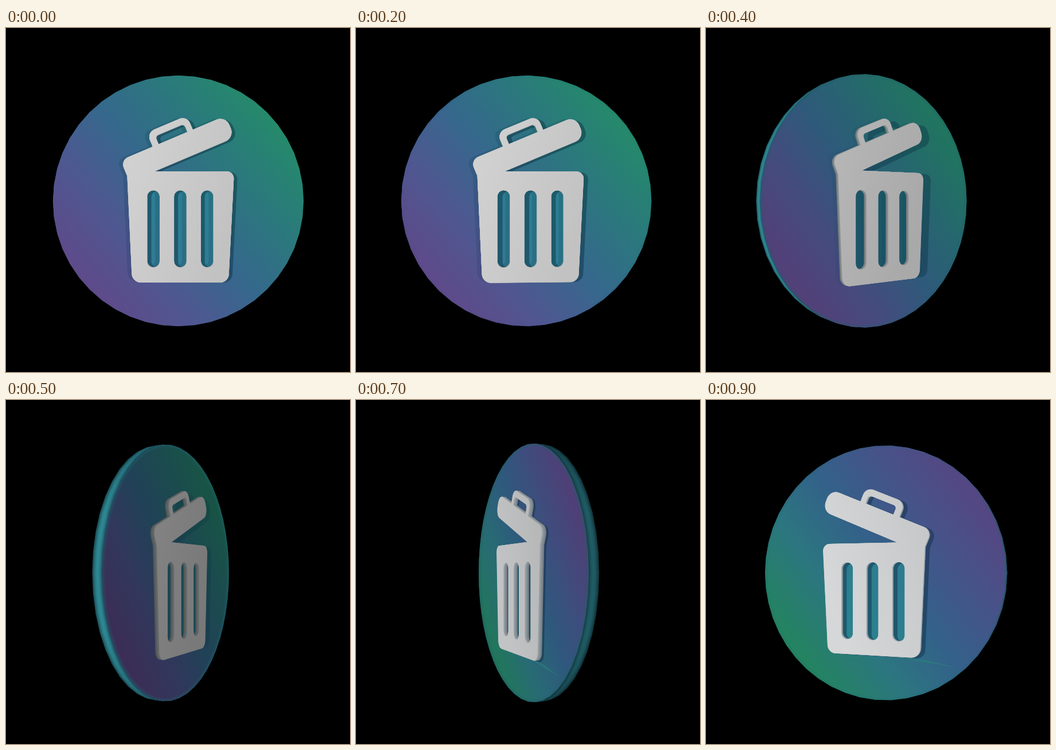
Animation of 600 by 600 pixels, one loop 1 s. Source, as an HTML page with a canvas:

```html
<!DOCTYPE html>
<html lang="en">
<head>
<meta charset="utf-8">
<title>Turning bin badge</title>
<style>
html, body { margin: 0; width: 100%; height: 100%; overflow: hidden; background: #000; }
canvas { display: block; width: 100vmin; height: 100vmin; }
</style>
</head>
<body>
<canvas id="stage" width="600" height="600"></canvas>
<script>
const ctx = document.getElementById('stage').getContext('2d');
const CX = 300.5, CY = 301.5, EYE = 857;
const R = 218, TOP = 2.5, BOTTOM = -14, RISE = 7.5;
const LOOP = 1000, STEP = 100, START = 117, TURN = 980;

const rgb = (c, k = 1, a = 1) => `rgba(${c.map(v => Math.round(Math.min(255, v * k)))},${a})`;
let cos = 1, sin = 0;

// Local point on the badge to stage point
function project(x, y, z) {
  const k = EYE / (EYE + x * sin - z * cos);
  return [CX + (x * cos + z * sin) * k, CY + y * k];
}

// Polygon with circular corners
function rounded(points, radii) {
  const out = [], n = points.length;
  points.forEach((p, i) => {
    const toward = q => {
      const d = Math.hypot(q[0] - p[0], q[1] - p[1]);
      return [p[0] + (q[0] - p[0]) * radii[i] / d, p[1] + (q[1] - p[1]) * radii[i] / d];
    };
    const a = toward(points[(i + n - 1) % n]), b = toward(points[(i + 1) % n]);
    for (let s = 0; s <= 8; s++) {
      const t = s / 8, wa = (1 - t) ** 2, wp = 1.414 * t * (1 - t), wb = t * t, w = wa + wp + wb;
      out.push([0, 1].map(j => (wa * a[j] + wp * p[j] + wb * b[j]) / w));
    }
  });
  return out;
}

const box = (l, t, r, b) => [[l, t], [r, t], [r, b], [l, b]];
const tilt = ([u, n]) => [u * .92 + n * .39, -u * .39 + n * .92];
const place = shape => shape.map(([x, y]) => [(x - CX) / 1.0118, (y - CY) / 1.0118]);

const slots = [246, 293, 340].map(x => place(rounded(box(x, 283, x + 22, 418), [11, 11, 11, 11])));
const icon = [
  place(rounded([[211, 250], [398, 250], [388, 444], [220, 444]], [4, 13, 14, 15])),
  place(rounded(box(94, 290.6, 293, 331.4).map(tilt), [14, 17, 17, 12])),
  place(rounded(box(155, 264, 231, 306).map(tilt), [14, 14, 1, 1])),
  place(rounded(box(166, 275, 221, 302).map(tilt), [6, 6, 1, 1])).reverse(),
  ...slots.map(s => [...s].reverse())
];
const disc = [Array.from({ length: 48 }, (_, i) => {
  const a = i * Math.PI / 24;
  return [R * Math.sin(a), -R * Math.cos(a)];
})];

function trace(shapes, z, dx = 0, dy = 0) {
  ctx.beginPath();
  for (const shape of shapes) {
    shape.forEach(([x, y], i) => {
      const p = project(x + dx, y + dy, z);
      i ? ctx.lineTo(...p) : ctx.moveTo(...p);
    });
    ctx.closePath();
  }
}

function fill(shapes, z, style, dx, dy) {
  trace(shapes, z, dx, dy);
  ctx.fillStyle = style;
  ctx.fill();
}

// Gradient fixed to the badge surface, fitted to its projected width
function fillGradient(shapes, z, from, to, colors, k) {
  const g = ctx.createLinearGradient(...from, ...to);
  colors.forEach((c, i) => g.addColorStop(i / (colors.length - 1), rgb(c, k)));
  trace(shapes, z);
  const a = project(-170, 0, z), b = project(170, 0, z);
  const sx = (b[0] - a[0]) / 340;
  ctx.save();
  ctx.transform(Math.abs(sx) < .005 ? .005 : sx, 0, 0, 1, (a[0] + b[0]) / 2, CY);
  ctx.fillStyle = g;
  ctx.fill();
  ctx.restore();
}

const FRONT = [[94, 74, 138], [78, 88, 145], [53, 104, 140], [43, 120, 125], [37, 137, 107]];
const BACK = [[87, 70, 131], [70, 84, 138], [51, 98, 138], [44, 119, 129], [36, 132, 98]];
const TEAL = [46, 135, 148], MID = [34, 102, 115], DARK = [18, 56, 68];

function drawIcon(front, light) {
  const base = front ? TOP : BOTTOM, dir = front ? 1 : -1;
  const grey = front ? [201, 201, 201] : [207, 208, 209];
  const wall = front ? [158, 165, 167] : [158, 168, 175];
  for (let d = 0; d < RISE; d += .5) {
    fill(icon, base + dir * d, rgb(wall, light * (.8 + .04 * d)));
  }
  const hi = grey.map(v => v + 8), lo = grey.map(v => v - 7);
  fillGradient(icon, base + dir * RISE, [-95, -30], [95, 30], front ? [hi, lo] : [lo, hi], light);
}

function drawFace(front, light) {
  const z = front ? TOP : BOTTOM;
  if (front) fillGradient(disc, z, [-160, 144], [170, -130], FRONT, light);
  else fillGradient(disc, z, [-190, -120], [150, 135], BACK, light);

  ctx.save();
  trace(disc, z);
  ctx.clip();
  ctx.strokeStyle = rgb(DARK.map((v, i) => (v + TEAL[i]) / 2), 1, .22 * Math.abs(sin));
  for (const w of [10, 6, 3]) {
    ctx.lineWidth = w;
    ctx.stroke();
  }
  fill(slots, z, rgb([43, 133, 148], light, .75));
  if (front) {
    fill(icon, z, rgb([8, 48, 66], 1, .16 * cos ** 4), -8, -1);
    fill(icon, z, rgb([8, 44, 60], 1, .44 * cos), 7 + 31 * sin, 1);
  } else {
    fill(icon, z, rgb([14, 40, 66], 1, .45), -7, 2);
    fill([[[-30, 142], [-90, 145], [-142, 154], [-90, 149]]], z, rgb([42, 128, 124], 1, .6));
  }
  ctx.restore();
}

function drawRim(front) {
  const power = front ? 1 : .68;
  const [far, near] = front ? [BOTTOM, TOP] : [TOP, BOTTOM];
  for (let i = 0; i < 32; i++) {
    const k = i / 32, z = far + (near - far) * k;
    const glow = power * (.45 + .55 * Math.sin(Math.PI * (.05 + k * .85)));
    fillGradient(disc, z, [-R, 0], [40, 0], [TEAL, MID, DARK], glow);
  }
}

function draw(time) {
  const now = Math.floor(time % LOOP / STEP) * STEP;
  const p = Math.min(1, Math.max(0, (now - START) / TURN));
  const angle = Math.PI * p * p * (3 - 2 * p);
  cos = Math.cos(angle);
  sin = Math.sin(angle);
  const front = cos > 0;
  const light = Math.abs(cos) ** (front ? .65 : .12);

  ctx.fillStyle = '#000';
  ctx.fillRect(0, 0, 600, 600);
  drawIcon(!front, .55);
  drawRim(front);
  drawFace(front, light);
  drawIcon(front, Math.max(light, .3));
}

const begin = performance.now();
function tick() {
  draw(performance.now() - begin);
  requestAnimationFrame(tick);
}
tick();
</script>
</body>
</html>
```
